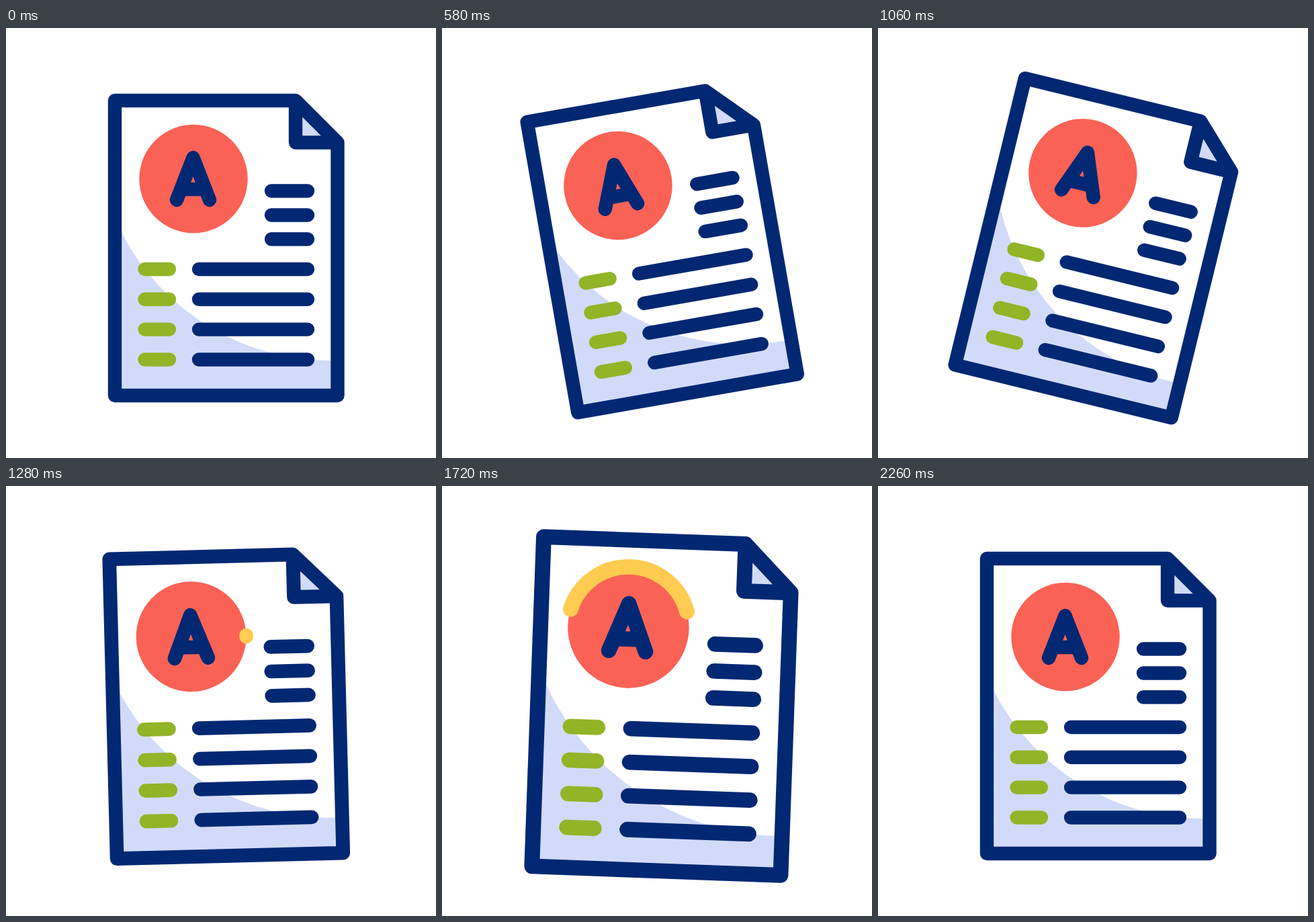
Recreate the animation shown at these times as an HTML page. Size 640 px wide and 640 px high, loop 2400 ms.

```html
<!DOCTYPE html>
<html lang="en">
<head>
<meta charset="utf-8">
<title>Graded paper</title>
<style>
  html, body { margin: 0; width: 100%; height: 100%; overflow: hidden; background: #fff; }
  svg { display: block; width: 100vw; height: 100vh; }
  .ink, .mark, #ring { fill: none; stroke-width: 20.4; stroke-linecap: round; stroke-linejoin: round; }
  .ink { stroke: #022873; }
  .mark { stroke: #92b427; }
  #ring { stroke: #ffcb50; }
  .shade { fill: #d1dbf9; }
</style>
</head>
<body>
<svg viewBox="0 0 640 640">
  <g id="page">
    <path class="shade" d="M162 283 L172 304 A349 349 0 0 0 483 495 H493 V547 H162 Z"/>
    <path class="shade" d="M431 108 L493.5 170.5 H431 Z"/>
    <path class="ink" d="M162 108 H431 L493.5 170.5 V547 H162 Z M431 108 V170.5 H493.5"/>
    <circle cx="279" cy="224.5" r="80.7" fill="#fa6256"/>
    <path id="ring"/>
    <path class="ink" d="M254 256 L278.5 193 L303 256 M264 240 H293"/>
    <path class="ink" d="M395 242.5 H449 M395 278.5 H449 M395 314.3 H449"/>
    <path class="ink" d="M287 359 H449 M287 403.8 H449 M287 448.6 H449 M287 493.5 H449"/>
    <path class="mark" d="M206.5 359 H243 M206.5 403.8 H243 M206.5 448.6 H243 M206.5 493.5 H243"/>
  </g>
</svg>
<script>
  const LOOP = 2400, STEP = 20;
  const CENTER = { x: 327.75, y: 327.5 };
  const BADGE = { x: 279, y: 224.5, r: 80.7 };

  // Tracks of [time in ms, value], eased in and out between keys
  const tilt = [[200, 0], [600, -10], [1000, 15], [1400, -6], [1800, 3], [2260, 0]];
  const zoom = [[1200, 1], [1600, 1.15], [2000, 1]];
  const ringHead = [[1260, 0], [1790, 360]];
  const ringTail = [[1490, 0], [1925, 360]];

  const page = document.getElementById('page');
  const ring = document.getElementById('ring');

  function valueAt(track, t) {
    if (t <= track[0][0]) return track[0][1];
    for (let i = 1; i < track.length; i++) {
      const [t0, a] = track[i - 1], [t1, b] = track[i];
      if (t < t1) {
        const u = (t - t0) / (t1 - t0);
        return a + (b - a) * u * u * (3 - 2 * u);
      }
    }
    return track[track.length - 1][1];
  }

  function badgePoint(deg) {
    const a = deg * Math.PI / 180;
    return `${BADGE.x + BADGE.r * Math.cos(a)} ${BADGE.y + BADGE.r * Math.sin(a)}`;
  }

  function arc(from, to) {
    if (to - from < 0.1) return '';
    const large = to - from > 180 ? 1 : 0;
    return `M${badgePoint(from)} A${BADGE.r} ${BADGE.r} 0 ${large} 1 ${badgePoint(to)}`;
  }

  function draw(t) {
    const { x, y } = CENTER;
    page.setAttribute('transform',
      `translate(${x} ${y}) rotate(${valueAt(tilt, t)}) scale(${valueAt(zoom, t)}) translate(${-x} ${-y})`);
    ring.setAttribute('d', arc(valueAt(ringTail, t), valueAt(ringHead, t)));
  }

  const start = performance.now();
  function tick() {
    const t = (performance.now() - start) % LOOP;
    draw(Math.floor(t / STEP) * STEP);
    requestAnimationFrame(tick);
  }
  tick();
</script>
</body>
</html>
```
